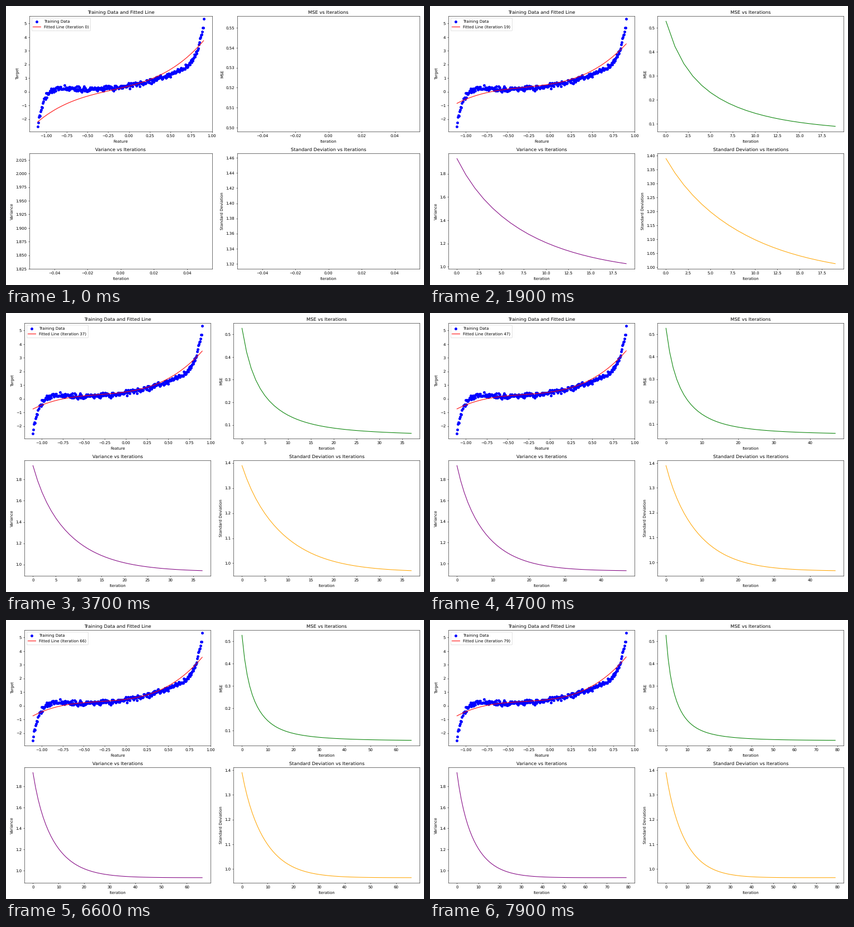
These frames come from a looping animation (750x500 px, 8 s). A matplotlib script:

```python
import numpy as np
import matplotlib.pyplot as plt
from matplotlib.animation import FuncAnimation

# Unhinted glyphs keep text heights true at this low resolution
plt.rcParams['text.hinting'] = 'no_hinting'

STEPS = 80
PAD = 1.1
rng = np.random.default_rng(4)


def decay(n, tau):
    return np.exp(-n / tau)


# Noisy training data, centred on u = x + 0.1
x = np.linspace(-1.1, 0.9, 300)
u = x + 0.1
y = 0.35 + 0.85 * u + 1.1 * u**2 - 0.12 * u**12 + 2.98 * u**13
y += rng.normal(0, 0.1, x.size).clip(-0.22, 0.22)

# Training history
it = np.arange(STEPS)
mse = 0.054 + 0.092 * decay(it, 16) + 0.266 * decay(it, 5.3) + 0.115 * decay(it, 1.6)
var = 0.928 + 4e-5 * it + 0.888 * decay(it, 8.6) + 0.115 * decay(it, 2.2)
std = np.sqrt(var)


def fitted(n):
    """Cubic through the two moving end values at iteration n."""
    lo = -0.74 - 1.46 * decay(n, 7.3)
    hi = 3.66 - 0.6 * decay(n, 40) + 0.69 * decay(n, 17)
    k = 0.4 + 0.2 * decay(n, 18) - 0.33 * decay(n, 3)
    d = 1.7 - 0.55 * decay(n, 50) + 0.4 * decay(n, 9)
    b = (hi - lo) / 2 - d
    c = (hi + lo) / 2 - k
    return k + b * u + c * u**2 + d * u**3


fig, axes = plt.subplots(2, 2, figsize=(15, 10), dpi=50)
ax = axes[0, 0]
ax.scatter(x, y, color='blue', label='Training Data')
fit, = ax.plot(x, fitted(0), color='red', label='Fitted Line (Iteration 0)')
ax.set(title='Training Data and Fitted Line', xlabel='Feature', ylabel='Target',
       ylim=(-2.915, 5.555))
legend = ax.legend(loc='upper left')


def history(ax, values, name, color):
    line, = ax.plot(it[:1], values[:1], color=color)
    ax.set(title=f'{name} vs Iterations', xlabel='Iteration', ylabel=name)
    return ax, line, values


curves = [history(axes[0, 1], mse, 'MSE', 'green'),
          history(axes[1, 0], var, 'Variance', 'purple'),
          history(axes[1, 1], std, 'Standard Deviation', 'orange')]
fig.tight_layout(pad=PAD)


def update(n):
    fit.set_ydata(fitted(n))
    legend.get_texts()[1].set_text(f'Fitted Line (Iteration {n})')
    for ax, line, values in curves:
        line.set_data(it[:n + 1], values[:n + 1])
        ax.relim()
        ax.autoscale_view()
    # Margins follow the current tick labels
    fig.tight_layout(pad=PAD)
    return []


anim = FuncAnimation(fig, update, frames=STEPS, interval=100,
                     init_func=lambda: update(0), repeat=True, repeat_delay=0)
plt.show()
```
